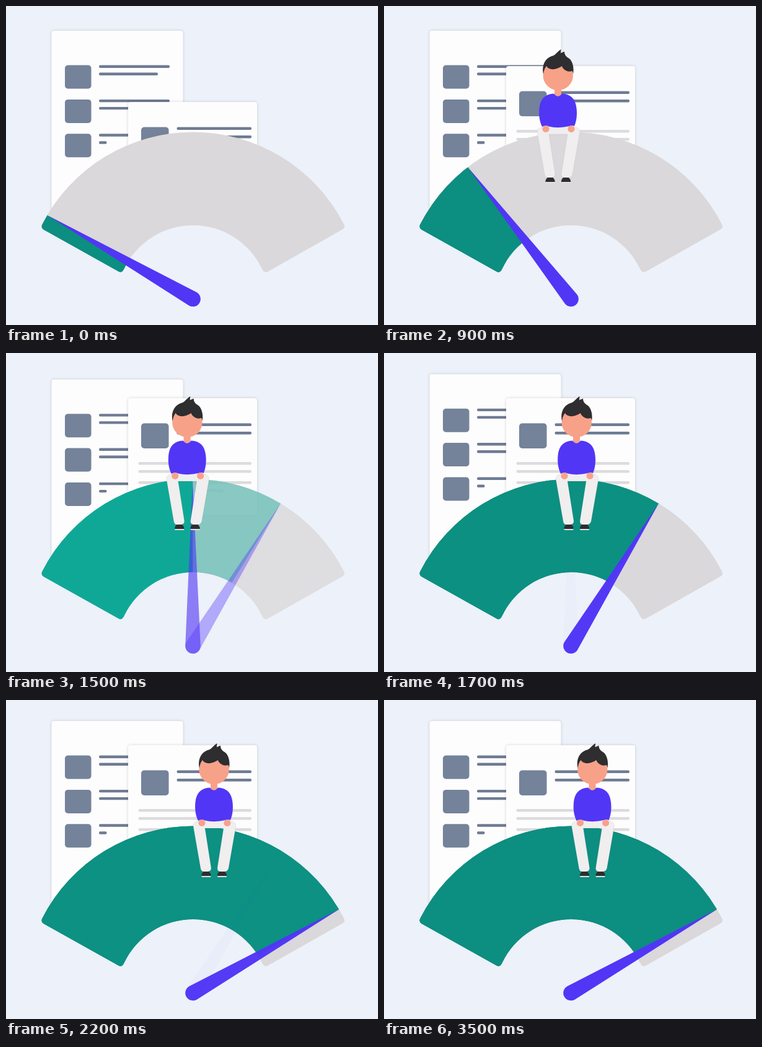
Recreate the animation shown at these times as an HTML page with a canvas. Size 600 by 515 pixels, loop 3.7 s.

```html
<!DOCTYPE html>
<html lang="en">
<head>
<meta charset="utf-8">
<title>Gauge</title>
<style>
  html, body { margin: 0; width: 100%; height: 100%; overflow: hidden; background: #edf1f9; }
  canvas { display: block; }
</style>
</head>
<body>
<canvas id="stage" width="600" height="515"></canvas>
<script>
const ctx = document.getElementById('stage').getContext('2d');
const LOOP = 3700, STEP = 100;
const FIRST_START = 410, INTERVAL = 507, DURATION = 300;

// Each pose: needle tip, tops of the two documents, figure offset and visibility
const poses = [
  { tip: [67, 338],  back: 40, front: 155, shift: 0,    figure: 0 },
  { tip: [135, 260], back: 40, front: 97,  shift: 0,    figure: 1 },
  { tip: [301, 206], back: 48, front: 73,  shift: 0,    figure: 1 },
  { tip: [443, 243], back: 34, front: 73,  shift: 30.5, figure: 1 },
  { tip: [537, 338], back: 34, front: 73,  shift: 55.5, figure: 1 }
];
const pivot = [301.5, 473];
const SLATE = '#74829a', LINE = '#6f7b93', PALE = '#dcdbdd';
const VIOLET = '#5136f6', SKIN = '#f8a189', DARK = '#2e2d2f';

const gauge = new Path2D(`M58.7 352 A273 273 0 0 1 544.7 352 Q548 357 543 360.5
  L422 429 Q416 431.5 412.7 424 A123 123 0 0 0 190.7 424 Q187.5 431.5 182 429
  L60.5 361 Q55.5 357.5 58.7 352 Z`);
const trousers = new Path2D(`M247 203 Q247 196 257 195 L306 195 Q316 196 316 203
  L304 272 Q302.5 277 297 277 L290 277 Q285.5 276 286 271 L296 207 L266 207
  L276 271 Q276.5 276 271 277 L264 277 Q260 277 259 272 Z`);
const shirt = new Path2D(`M274 141.5 Q280.5 150 287 141.5 C301 142 309 150 310.5 165
  C312 177 310 187 307 194 Q303 192 299 194 Q281 198 266 194.5 Q260 192 255 195
  C250.5 185 249.5 176 250.5 165 C252 150 260 142 274 141.5 Z`);
const hair = new Path2D(`M257 110 C254 97 259 84 272 80.5 C277 79 280 73 285.5 70
  L285 76 L291 73.5 C291 79 294 82 299 85 C304 89 307 100 305 110
  Q305 107 303.5 105 Q297 107 293 104 Q288 101 287 97 Q278 103 270 102
  Q264 101 262 97 Q258 102 257 110 Z`);

const mix = (a, b, p) => a + (b - a) * p;

function box(x, y, w, h, r, color) {
  ctx.fillStyle = color;
  ctx.beginPath();
  ctx.roundRect(x, y, w, h, r);
  ctx.fill();
}

function bar(x, y, right, color = LINE) {
  box(x, y, right - x, 4.4, 2, color);
}

function ellipse(x, y, rx, ry, color, from = 0, to = Math.PI * 2) {
  ctx.fillStyle = color;
  ctx.beginPath();
  ctx.ellipse(x, y, rx, ry, 0, from, to);
  ctx.fill();
}

function paper(x, y, w, h) {
  ctx.save();
  ctx.shadowColor = 'rgba(60, 60, 70, .22)';
  ctx.shadowBlur = 4;
  box(x, y, w, h, 4, '#fefdfe');
  ctx.restore();
}

function backDocument(top) {
  paper(73.5, top, 212, 306);
  [[264, 245], [264, 245], [264, 162.5]].forEach(([long, short], row) => {
    const y = top + 55.5 + row * 55.4;
    box(95, y, 42.5, 38, 5, SLATE);
    bar(150, y, long);
    bar(150, y + 12, short);
  });
}

function frontDocument(top) {
  paper(197, top, 208, 189);
  box(218, top + 40.5, 44.5, 40.5, 5, SLATE);
  bar(275.5, top + 40.5, 396);
  bar(275.5, top + 54, 396);
  [[103, 396], [116, 396], [134, 396], [147, 351]].forEach(([y, right]) =>
    bar(213.5, top + y, right, PALE));
}

function wedge(tip, color, alpha) {
  const angle = Math.atan2(tip[1] - pivot[1], tip[0] - pivot[0]);
  ctx.save();
  ctx.globalAlpha = alpha;
  ctx.beginPath();
  ctx.moveTo(...pivot);
  ctx.arc(...pivot, 400, -Math.PI, angle);
  ctx.clip();
  ctx.fillStyle = color;
  ctx.fill(gauge);
  ctx.restore();
}

function needle(tip, alpha) {
  const dx = tip[0] - pivot[0], dy = tip[1] - pivot[1];
  const k = 12.3 / Math.hypot(dx, dy);
  const path = new Path2D();
  path.moveTo(...tip);
  path.lineTo(pivot[0] - dy * k, pivot[1] + dx * k);
  path.arc(...pivot, 12.3, Math.atan2(dx, -dy), Math.atan2(dx, -dy) + Math.PI * 2);
  path.lineTo(pivot[0] + dy * k, pivot[1] - dx * k);
  path.closePath();
  ctx.globalAlpha = alpha;
  ctx.fillStyle = VIOLET;
  ctx.fill(path);
  ctx.globalAlpha = 1;
}

function person(shift, alpha) {
  ctx.save();
  ctx.globalAlpha = alpha;
  ctx.translate(shift, 0);
  for (const x of [268, 293.5]) {
    box(x - 7.5, 283, 15, 3, 1, '#e3e1e2');
    ellipse(x, 284, 7.7, 8.5, DARK, Math.PI, Math.PI * 2);
  }
  ctx.fillStyle = '#f0eeef';
  ctx.fill(trousers);
  ctx.strokeStyle = 'rgba(0, 0, 0, .06)';
  ctx.stroke(trousers);
  box(275, 130, 11, 17, 5, SKIN);
  ctx.fillStyle = VIOLET;
  ctx.fill(shirt);
  ellipse(261, 198.5, 5.6, 5.4, SKIN);
  ellipse(302, 198.5, 5.6, 5.4, SKIN);
  ellipse(280.7, 112, 24.2, 24, SKIN);
  ctx.fillStyle = DARK;
  ctx.fill(hair);
  ctx.restore();
}

function draw(time) {
  const sinceFirst = time - FIRST_START;
  const index = Math.max(0, Math.min(3, Math.floor(sinceFirst / INTERVAL)));
  const t = Math.max(0, Math.min(1, (sinceFirst - index * INTERVAL) / DURATION));
  const p = 1 - (1 - t) ** 1.65;
  const from = poses[index], to = poses[index + 1];
  const at = key => mix(from[key], to[key], p);
  // Layers turn slightly translucent halfway through a dissolve
  const blend = 4 * p * (1 - p);
  const green = `rgb(12, ${142 + 28 * blend}, ${128 + 24 * blend})`;

  ctx.fillStyle = '#edf1f9';
  ctx.fillRect(0, 0, 600, 515);
  backDocument(at('back'));
  frontDocument(at('front'));

  ctx.globalAlpha = 1 - blend / 4;
  ctx.fillStyle = '#dad8da';
  ctx.fill(gauge);
  ctx.globalAlpha = 1;
  wedge(from.tip, green, 1 - blend * 0.03);
  wedge(to.tip, green, Math.min(1, p * 1.1));
  needle(from.tip, 1 - p);
  needle(to.tip, p);
  person(at('shift'), at('figure'));
}

const start = performance.now();
function tick() {
  const time = (performance.now() - start) % LOOP;
  draw(Math.min(LOOP - 2 * STEP, Math.floor(time / STEP) * STEP));
  requestAnimationFrame(tick);
}
tick();
</script>
</body>
</html>
```
